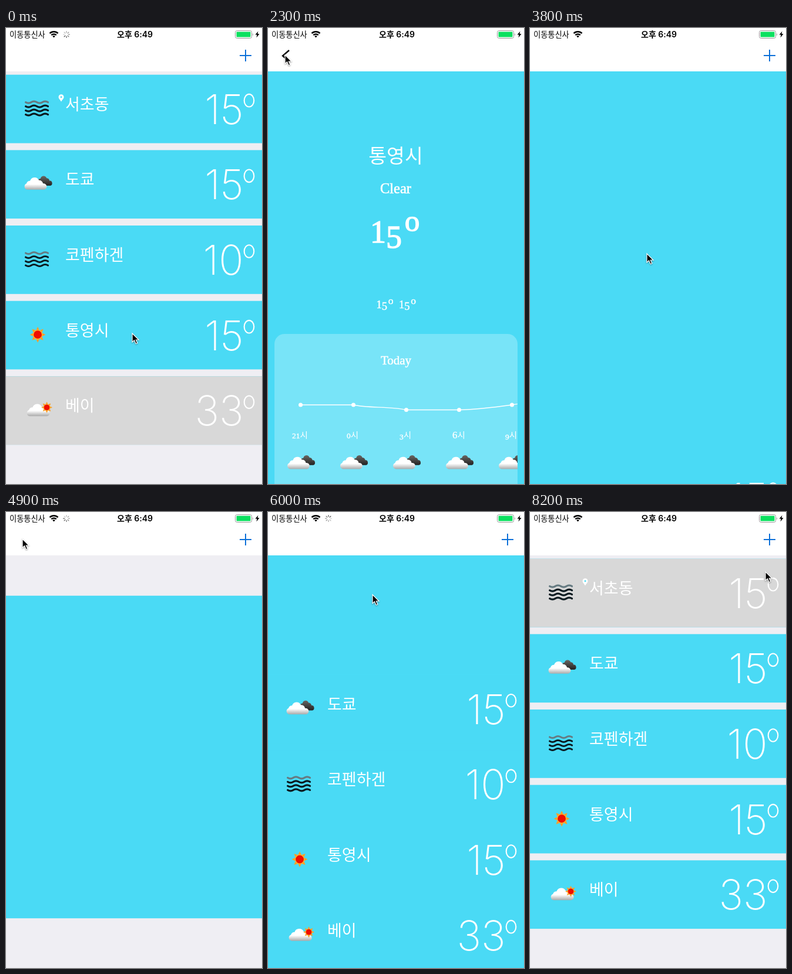
Recreate the animation shown at these times as an HTML page. Size 436 by 778 pixels, loop 8.3 s.

```html
<!DOCTYPE html>
<html lang="ko">
<head>
<meta charset="utf-8">
<style>
  html, body { margin: 0; width: 100%; height: 100%; overflow: hidden; background: #efeef3; }
  svg { display: block; width: 436px; height: 778px; }
  text { font-family: "Noto Sans CJK KR", "Noto Sans CJK", sans-serif; white-space: pre; }
  .name { font-weight: 300; fill: #fff; }
  .temp { font: 150 70px Inter, sans-serif; text-anchor: end; fill: #fff; }
  .serif { font-family: "Liberation Serif", "Noto Sans CJK KR", serif; fill: #fff; stroke: #fff; stroke-width: .025em; }
  .hour { font-size: 14.5px; font-weight: 300; stroke: none; }
  .mid { text-anchor: middle; }
  .line { fill: none; stroke-linecap: round; stroke-linejoin: round; }
</style>
</head>
<body>
<svg viewBox="0 0 436 778">
  <defs>
    <linearGradient id="white" x2="0" y2="1">
      <stop offset=".55" stop-color="#fff"/><stop offset="1" stop-color="#aaa"/>
    </linearGradient>
    <linearGradient id="dark" x2="0" y2="1">
      <stop stop-color="#6a6662"/><stop offset="1" stop-color="#222"/>
    </linearGradient>
    <clipPath id="panelClip"><rect x="11" y="522" width="414" height="400"/></clipPath>
    <path id="cloud" d="M6 24A5.500 5.500 0 0 1 5 13.500 6 6 0 0 1 11 9 8 8 0 0 1 26 8 6.500 6.500 0 0 1 33 13.500 5.300 5.300 0 0 1 35 24Z"/>
    <g id="sun"></g>
    <g id="clouds">
      <use href="#cloud" transform="translate(51 41.5) scale(.7 .8)" fill="url(#dark)"/>
      <use href="#cloud" transform="translate(30 43.5)" fill="url(#white)"/>
    </g>
    <g id="fog" class="line" stroke-width="3.200"></g>
    <use id="clear" href="#sun" transform="translate(54 57.5)"/>
    <g id="partly">
      <use href="#cloud" transform="translate(34 44) scale(1.03 1)" fill="url(#white)"/>
      <use href="#sun" transform="translate(69.5 53) scale(.7)"/>
    </g>
  </defs>

  <rect width="436" height="778" fill="#efeef3"/>
  <rect id="sheet" width="436" fill="#4adaf5"/>
  <g id="cells"></g>
  <g id="detail"></g>

  <rect width="436" height="74" fill="#fff"/>
  <path id="plus" d="M398 47H418M408 37V57" stroke="#0b70d8" stroke-width="2"/>
  <path id="back" d="M36 38L25 47.5 36 57" fill="none" stroke="#000" stroke-width="2.4"/>
  <text x="6" y="15.5" font-size="13.2">이동통신사</text>
  <text x="219.5" y="16" font-size="14" font-weight="600" class="mid" style="font-family:Inter,'Noto Sans CJK KR',sans-serif">오후 6:49</text>
  <g fill="none" stroke="#000" stroke-width="2.5">
    <path d="M74.5 9.2a10 10 0 0 1 14 0M77.3 12.1a6 6 0 0 1 8.4 0"/>
    <path d="M79.2 14a3.3 3.3 0 0 1 4.6 0L81.5 16.6Z" fill="#000" stroke="none"/>
  </g>
  <g id="spinner" stroke="#444" stroke-width="1.2" stroke-linecap="round"></g>
  <rect x="390.5" y="4.5" width="28" height="13" rx="3" fill="none" stroke="#999"/>
  <rect x="392.5" y="6.5" width="24" height="9" rx="1" fill="#0be05f"/>
  <path d="M420 9q2 2 0 4.500z" fill="#999"/>
  <path d="M429.500 5.500L424.500 11.500H427.500L426.500 16.500 431.500 10H428.500Z"/>
  <path id="cursor" d="M0 0V15L3.500 11.800 6.200 17.800 8.800 16.700 6.300 11H11Z" stroke="#fff" stroke-width="1.200" style="filter:drop-shadow(0 1px 1px #0006)"/>
</svg>
<script>
const LOOP = 8300, TOP = 74, BOTTOM = 778, PITCH = 128.65, CELL = 116.8, TRAVEL = 704, MOVE = 500;
const BLUE = '#4adaf5', GRAY = '#d8d8d8';
const $ = id => document.getElementById(id);
const clamp = v => Math.max(0, Math.min(1, v));
const mix = (a, b, p) => a + (b - a) * p;
const easeInOut = p => p < .5 ? 2 * p * p : 1 - 2 * (1 - p) ** 2;
const range = n => [...Array(n).keys()];
const show = (el, on) => el.setAttribute('visibility', on ? 'visible' : 'hidden');
const cellTop = i => 79.7 + PITCH * i;

const cities = [
  { name: '서초동', temp: 15, icon: 'fog', sky: 'Mist' },
  { name: '도쿄', temp: 15, icon: 'clouds', sky: 'Clouds' },
  { name: '코펜하겐', temp: 10, icon: 'fog', sky: 'Mist' },
  { name: '통영시', temp: 15, icon: 'clear', sky: 'Clear' },
  { name: '베이', temp: 33, icon: 'partly', sky: 'Clouds' }
];

const visits = [
  { cell: 3, open: 50, close: 2400 },
  { cell: 2, open: 3579, close: 4867 },
  { cell: 0, open: 5890, close: 7346 }
];

// time, x, y of the pointer tip
const pointer = [
  [0, 215, 521], [250, 215, 521], [900, 385, 64], [1150, 388, 69], [1250, 388, 69],
  [1600, 380, 150], [2200, 29, 46], [2550, 29, 46], [3400, 199, 385], [3950, 199, 385],
  [4650, 28, 46], [4950, 28, 46], [5300, 51, 67], [5750, 178, 141], [6200, 178, 141],
  [6900, 25, 48], [7500, 25, 48], [8200, 401, 102]
];

$('sun').innerHTML = range(8).map(i =>
  `<path d="M-3 -7.500L0 -13.500 3 -7.500Z" fill="#f9a02a" transform="rotate(${i * 45})"/>`).join('') +
  '<circle r="7.600" fill="#f00d00" stroke="#ffb52e" stroke-width="1.300"/>';

$('fog').innerHTML = range(4).map(i =>
  `<path d="M33.500 ${47 + i * 7}q5 3 9.500 0t9.500 0 9.500 0 9.500 0" stroke="${i ? '#0b1a20' : '#667b82'}"/>`).join('');

$('spinner').innerHTML = range(8).map(i =>
  `<path d="M0 -3V-5.500" transform="translate(103 11) rotate(${i * 45})"/>`).join('');

$('cells').innerHTML = cities.map(({ name, temp, icon }, i) => `<g>
  <rect width="436" height="${CELL}"/>
  <g>
    <use href="#${icon}"/>
    ${i ? '' : '<path d="M94 46C92 42 89.500 41 89.500 38a4.500 4.500 0 0 1 9 0C98.500 41 96 42 94 46Z" fill="#fff"/><circle cx="94" cy="38" r="1.500" fill="#4adaf5"/>'}
    <text class="name" x="101" y="60" font-size="27">${name}</text>
    <text class="temp" x="404.500" y="84">${temp}</text>
    <ellipse cx="414" cy="44" rx="8.300" ry="10.800" fill="none" stroke="#fff" stroke-width="2.100"/>
  </g></g>`).join('');

// Old-style figures: some digits hang below the baseline, 6 and 8 rise above it.
const figures = (text, x, y, size, suffix = '') => `<text class="serif" x="${x}" y="${y}" font-size="${size}">` +
  [...String(text)].map(d =>
    `<tspan y="${y + ('34579'.includes(d) ? size * .17 : 0)}" font-size="${'68'.includes(d) ? size * 1.25 : size}">${d}</tspan>`).join('') +
  `<tspan y="${y}" class="hour">${suffix}</tspan></text>`;

const degrees = (value, x, y, size) => figures(value, x, y, size) +
  `<text class="serif" x="${x + size * 1.09}" y="${y - size * .37}" font-size="${size * .95}">o</text>`;

const hours = [21, 0, 3, 6, 9];
const detailMarkup = ({ name, temp, sky }) => `
  <text class="name mid" x="217.500" y="229.500" font-size="33.500">${name}</text>
  <text class="serif mid" x="217.500" y="282" font-size="24.500">${sky}</text>
  ${degrees(temp, 174, 366, 54)}
  ${degrees(temp, 184.5, 477.5, 18.5)}
  ${degrees(temp, 223, 477.5, 18.5)}
  <rect x="11" y="522" width="414" height="420" rx="17" fill="#fff" opacity=".25"/>
  <text class="serif mid" x="218" y="574" font-size="21">Today</text>
  <g clip-path="url(#panelClip)">
    <path d="M55.500 643H145.500C170 649 210 645 235.500 651.500H325.500C351 651 380 648 415.500 643L440 639" fill="none" stroke="#fff" stroke-width="1.300"/>
    ${hours.map((h, i) => {
      const x = 55.5 + 90 * i;
      return `<circle cx="${x}" cy="${i == 2 || i == 3 ? 651.5 : 643}" r="3.500" fill="#fff"/>
        ${figures(h, x - (h > 9 ? 14.5 : 11.5), 700, 13.5, '시')}
        <use href="#clouds" x="${1.5 + 90 * i}" y="685"/>`;
    }).join('')}
  </g>`;

const cells = [...$('cells').children];
let detailCity = -1;

function pointerAt(t) {
  const next = pointer.findIndex(k => k[0] > t);
  if (next < 0) return pointer[pointer.length - 1].slice(1);
  const a = pointer[next - 1], b = pointer[next];
  const p = (t - a[0]) / (b[0] - a[0]);
  return [mix(a[1], b[1], p), mix(a[2], b[2], p)];
}

function draw(t) {
  const visit = visits.filter(v => v.open <= t).pop();
  const selected = visit ? visit.cell : 4;
  const closing = visit && t >= visit.close;
  const resting = !visit || t >= visit.close + MOVE;

  let shift = 0, cover = 0;
  if (!resting) {
    shift = TRAVEL * (closing
      ? (1 - (t - visit.close) / MOVE) ** 3
      : easeInOut(clamp((t - visit.open) / MOVE)));
    cover = closing ? 1 - clamp((t - visit.close) / 130) : clamp((t - visit.open) / 100);
  }

  const top = mix(cellTop(selected), TOP, cover);
  const bottom = mix(cellTop(selected) + CELL, BOTTOM, cover);
  $('sheet').setAttribute('y', top);
  $('sheet').setAttribute('height', bottom - top);

  cells.forEach((cell, i) => {
    const y = cellTop(i) + Math.sign(i - selected) * shift;
    cell.setAttribute('transform', `translate(0 ${y})`);
    cell.children[0].setAttribute('fill', resting && i == selected ? GRAY : BLUE);
    show(cell, resting || i != selected);
  });

  const inDetail = !resting && !closing && t >= visit.open + MOVE;
  if (inDetail && detailCity != selected) {
    detailCity = selected;
    $('detail').innerHTML = detailMarkup(cities[selected]);
  }
  show($('detail'), inDetail);
  if (inDetail) {
    const pull = 30 * Math.sin(Math.PI * clamp((t - 1250) / 850));
    $('detail').setAttribute('transform', `translate(0 ${pull})`);
    $('detail').setAttribute('opacity', clamp((t - visit.open - MOVE) / 150));
  }
  show($('back'), inDetail);
  show($('plus'), !inDetail);

  show($('spinner'), t < 1400 || (t > 4100 && t < 6900));
  const lead = Math.floor(t / 100) + 5;
  [...$('spinner').children].forEach((ray, i) =>
    ray.setAttribute('opacity', 1 - .1 * ((lead - i + 800) % 8)));

  $('cursor').setAttribute('transform', `translate(${pointerAt(t)})`);
}

function tick() {
  draw(performance.now() % LOOP);
  requestAnimationFrame(tick);
}
tick();
</script>
</body>
</html>
```
